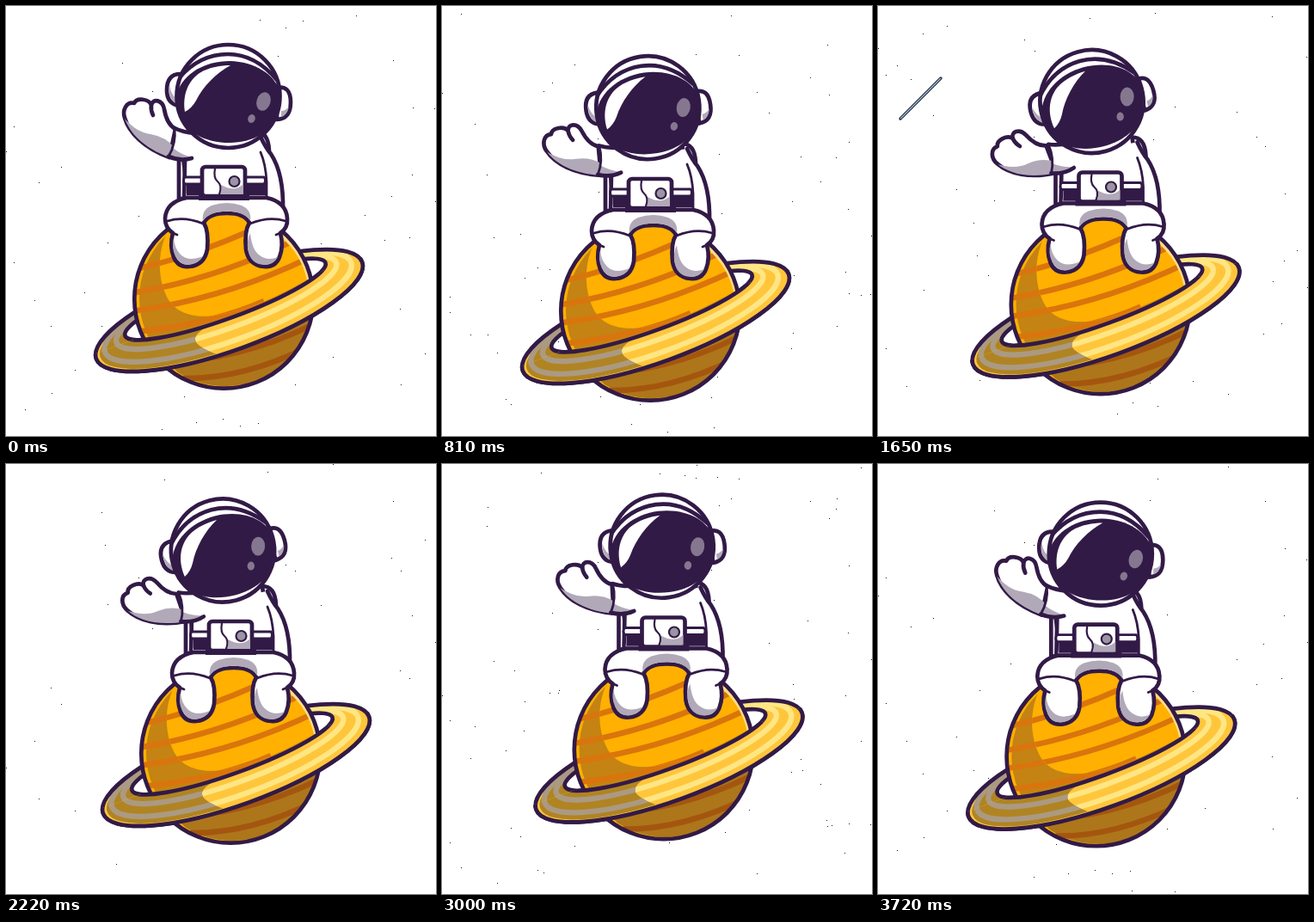
Write an HTML page that moves like this. It is 500 by 500 pixels and loops after 3.75 s.

```html
<!DOCTYPE html>
<html lang="en">
<head>
<meta charset="utf-8">
<title>Astronaut on a ringed planet</title>
<style>
  html, body { margin: 0; width: 100%; height: 100%; overflow: hidden; background: #fff; }
  svg { display: block; width: 500px; height: 500px; }
  .ink { fill: none; stroke: #321a47; stroke-width: 4.7; stroke-linecap: round; stroke-linejoin: round; }
  .suit { fill: #fff; }
  .thin { stroke-width: 2.8; }
  .fine { stroke-width: 2.2; }
  .grey { fill: #b1a9b8; }
  .dark { fill: #321a47; }
  .band { fill: none; stroke: #d9750c; stroke-width: 6.5; }
  .shade .band { stroke: #a4560f; }
  .stripe { fill: none; stroke-width: 6.3; }
</style>
</head>
<body>
<svg viewBox="0 0 500 500">
  <defs>
    <clipPath id="globe"><circle cx="253.3" cy="340.7" r="104"/></clipPath>
    <clipPath id="lit"><path d="M200 245C176 270 174 310 186 336C196 359 222 364 248 359C285 353 320 336 362 312V230H200Z"/></clipPath>
    <clipPath id="front"><rect x="-180" y="-6" width="360" height="70"/></clipPath>
    <clipPath id="dim"><path d="M-180-60H-25V8Q-54 12-48 24Q-43 34-27 46V60H-180Z"/></clipPath>
    <clipPath id="head"><circle cx="258.5" cy="105" r="59.5"/></clipPath>
    <path id="glove" d="M197 143C190 139 186 132 184 120C182 109 171 107 169 115C166 108 152 106 149 113C140 111 135 121 138 130C143 147 160 165 190 176Z"/>
    <clipPath id="hand"><use href="#glove"/></clipPath>
    <g id="bands">
      <path class="band" d="M150 306Q215 292 282 262"/>
      <path class="band" d="M145 334Q240 319 332 274"/>
      <path class="band" d="M145 355Q250 342 352 293"/>
      <path class="band" d="M150 379Q240 370 300 343"/>
    </g>
    <g id="stripes">
      <ellipse cy="-9.7" rx="136" ry="29.5"/>
      <ellipse cy="-4.1" rx="152.3" ry="39"/>
    </g>
    <g id="ring">
      <path fill="#ffc63c" fill-rule="evenodd" d="M-164.5 0a164.5 46 0 1 0 329 0a164.5 46 0 1 0-329 0ZM-123.8-13.8a124 22.5 0 1 0 248 0a124 22.5 0 1 0-248 0Z"/>
      <use href="#stripes" stroke="#ffe684" class="stripe"/>
      <g clip-path="url(#dim)">
        <path fill="#b08423" fill-rule="evenodd" d="M-159.5 0a159.5 43 0 1 0 319 0a159.5 43 0 1 0-319 0ZM-123.8-13.8a124 22.5 0 1 0 248 0a124 22.5 0 1 0-248 0Z"/>
        <use href="#stripes" stroke="#ab9a82" class="stripe"/>
      </g>
      <ellipse class="ink" rx="164.5" ry="46"/>
      <ellipse class="ink" cx=".2" cy="-13.8" rx="124" ry="22.5"/>
    </g>
  </defs>

  <path id="stars" stroke="#1c1c1c" fill="none" shape-rendering="crispEdges"/>
  <g id="meteor">
    <path d="M0 0L47-47" stroke="#1d2230" stroke-width="3.2" stroke-linecap="round"/>
    <path d="M0 0L47-47" stroke="#9cc4dc" stroke-width="1.3"/>
  </g>

  <g id="scene">
    <!-- planet -->
    <use href="#ring" transform="translate(259.5 354) rotate(-20)"/>
    <circle cx="253.3" cy="340.7" r="104" fill="#ffb000"/>
    <g clip-path="url(#globe)">
      <circle cx="256" cy="340" r="101" fill="#c48312"/>
      <g class="shade">
        <use href="#bands"/>
        <path fill="#ad761a" d="M165 392Q260 385 350 325L354 360A101 101 0 0 1 200 426Z"/>
        <path class="band" d="M180 414Q270 414 360 369"/>
        <path class="band" d="M206 433Q275 434 350 397"/>
      </g>
      <g clip-path="url(#lit)">
        <path fill="#ffb000" d="M160 230H362V370H160Z"/>
        <use href="#bands"/>
      </g>
      <path d="M322 268Q345 288 352 318" fill="none" stroke="#ffdd86" stroke-width="4"/>
    </g>
    <circle class="ink" cx="253.3" cy="340.7" r="104"/>
    <g transform="translate(259.5 354) rotate(-20)"><use href="#ring" clip-path="url(#front)"/></g>

    <!-- backpack and torso -->
    <path class="ink suit" d="M206 176H201V224H212ZM290 146Q305 146 306 168L294 176Z"/>
    <path class="suit" d="M209 165L207 228H302L322 237Q323 195 308 172Q302 165 296 152Z"/>
    <path class="ink" d="M208 180L207 228M322 237Q323 195 308 172Q302 165 296 152"/>
    <path class="grey" d="M209 218H302V228H209Z"/>
    <path class="ink thin" d="M296 170Q302 184 303 204V224"/>

    <!-- legs -->
    <path class="ink suit" d="M210 223Q186 228 185 247Q185 258 194 264Q190 279 195 292Q200 304 213 303Q231 301 234 283Q236 262 230 252Q236 241 257 241Q277 241 283 252Q277 262 279 283Q282 301 300 303Q313 304 318 292Q323 279 319 264Q328 258 327 247Q326 228 303 223Z"/>
    <path class="grey" d="M229 250Q227 237 239 232Q257 226 274 232Q286 237 284 250Q277 238.700 257 238.700Q237 238.700 229 250Z"/>
    <path class="grey" d="M195 270Q192 281 197 291Q202 301 212 301Q224 300 229 291Q212 298 203 289Q196 282 195 270ZM281 281Q283 300 300 301Q311 301 316 292Q304 297 295 290Q286 284 284 264Q280 272 281 281Z"/>
    <path class="ink thin" d="M188 250Q207 244 229 253M325 250Q306 244 284 253M194 264l5 2M319 264l-5 2"/>

    <!-- belt -->
    <path class="dark" d="M210 206H303V220H210ZM224 217H283V226H224Z"/>
    <path class="ink suit thin" d="M228 199H208Q205 203 208 207H228ZM278 199H300Q303 203 300 207H278Z"/>
    <rect class="ink suit" x="228" y="187" width="50" height="34" rx="4"/>
    <path class="grey" d="M249 219Q252 213 250 208Q266 217 276 207V219Z"/>
    <path class="ink fine" d="M243 189Q241 200 246 204Q252 209 248 219"/>
    <circle class="ink fine" cx="265.5" cy="204" r="6" style="fill:#9b94a2"/>

    <!-- waving arm -->
    <g id="upper">
      <g id="fore">
        <use href="#glove" class="ink suit"/>
        <path class="grey" clip-path="url(#hand)" d="M134 126Q150 147 168 149Q186 152 196 165L188 182L140 152Z"/>
        <path class="ink" d="M169 115Q168 121 171 127"/>
      </g>
      <path class="suit" d="M196 142Q207 148 230 148V174Q208 183 189 175Q197 160 196 142Z"/>
      <path class="grey" d="M190 174Q192 169 194 165Q204 173 216 176Q203 180 190 174Z"/>
      <path class="ink" d="M196 142Q206 147 220 148M189 175Q203 181 216 177"/>
      <path class="ink thin" d="M196 142Q198 160 189 175"/>
    </g>

    <!-- helmet -->
    <g id="helmet">
      <path class="ink suit" d="M203 79Q187 79 187 98Q187 114 202 116ZM315 95Q331 92 331 112Q331 131 315 132Z"/>
      <path class="grey" d="M190 92Q188 110 199 114V108Q192 104 190 92ZM320 129Q327 127 329 117Q325 122 320 122Z"/>
      <circle class="suit" cx="258.5" cy="105" r="60"/>
      <g clip-path="url(#head)">
        <path class="grey" d="M200 125Q222 165 262 164Q300 162 318 120V170H200Z"/>
        <path class="ink" d="M201 84Q225 56 258 56Q290 56 315 86"/>
        <path class="dark" d="M197 110C200 82 228 64 260 64C296 65 320 86 320 110C318 141 292 159 260 159C226 159 198 141 197 110Z"/>
        <path class="suit" d="M208 123C205 103 212 87 225 78C236 71 250 69 261 69C244 78 229 94 221 110Q216 119 208 123Z"/>
      </g>
      <circle class="ink" cx="258.5" cy="105" r="60"/>
      <g fill="#85778f">
        <ellipse cx="299.500" cy="111" rx="8" ry="11" transform="rotate(18 299.5 111)"/>
        <ellipse cx="285.500" cy="131" rx="4.200" ry="5" transform="rotate(18 285.5 131)"/>
      </g>
    </g>
  </g>
</svg>
<script>
const LOOP = 3750, STEP = 30;
// time, drift x, drift y, tilt, star count
const KEYS = [
  [0, 0, 0, 0, 60],
  [810, -11, 14, -8.5, 72],
  [1230, -1.5, 11.5, -13.8, 36],
  [1650, 5.5, 6.5, -16, 60],
  [2220, 8, -4, -15, 40],
  [3000, 4.5, -8.5, -7.6, 88]
];
const $ = id => document.getElementById(id);
const set = (id, value) => $(id).setAttribute('transform', value);

function key(i) {
  const n = KEYS.length, k = KEYS[(i + n) % n];
  return [k[0] + LOOP * Math.floor(i / n), ...k.slice(1)];
}

// smooth closed curve through the keys
function sample(t, c) {
  let i = KEYS.length - 1;
  while (KEYS[i][0] > t) i--;
  const [a, b, d, e] = [key(i - 1), key(i), key(i + 1), key(i + 2)];
  const h = d[0] - b[0], u = (t - b[0]) / h, v = 1 - u;
  const m0 = (d[c] - a[c]) / (d[0] - a[0]) * h;
  const m1 = (e[c] - b[c]) / (e[0] - b[0]) * h;
  return v * v * (1 + 2 * u) * b[c] + u * v * v * m0 + u * u * (3 - 2 * u) * d[c] - u * u * v * m1;
}

let seed = 71;
const rnd = () => (seed = seed * 16807 % 2147483647) / 2147483647;
const stars = Array.from({ length: 95 }, () => ({
  x: Math.floor(rnd() * 500), y: rnd() * 500, laps: 2 + Math.floor(rnd() * 4)
}));

function draw(t) {
  const tilt = sample(t, 3), count = sample(t, 4);
  set('scene', `translate(${sample(t, 1)} ${sample(t, 2)})`);
  set('helmet', `translate(${-tilt * 0.1} ${-tilt * 0.06}) rotate(${tilt} 245 165)`);
  set('upper', `rotate(${tilt * 1.1} 234 159)`);
  set('fore', `rotate(${tilt * 0.95} 194 158)`);

  $('stars').setAttribute('d', stars.slice(0, Math.round(count)).map(s => {
    const y = Math.floor((s.y + s.laps * 500 * t / LOOP) % 500);
    return `M${s.x} ${y + 0.5}h1`;
  }).join(''));

  const run = (t - 1650) * 0.9;
  set('meteor', `translate(${26 - run} ${131 + run})`);
  $('meteor').style.display = t >= 1440 && t <= 1740 ? '' : 'none';
}

function tick() {
  draw(Math.floor(performance.now() % LOOP / STEP) * STEP);
  requestAnimationFrame(tick);
}
tick();
</script>
</body>
</html>
```
